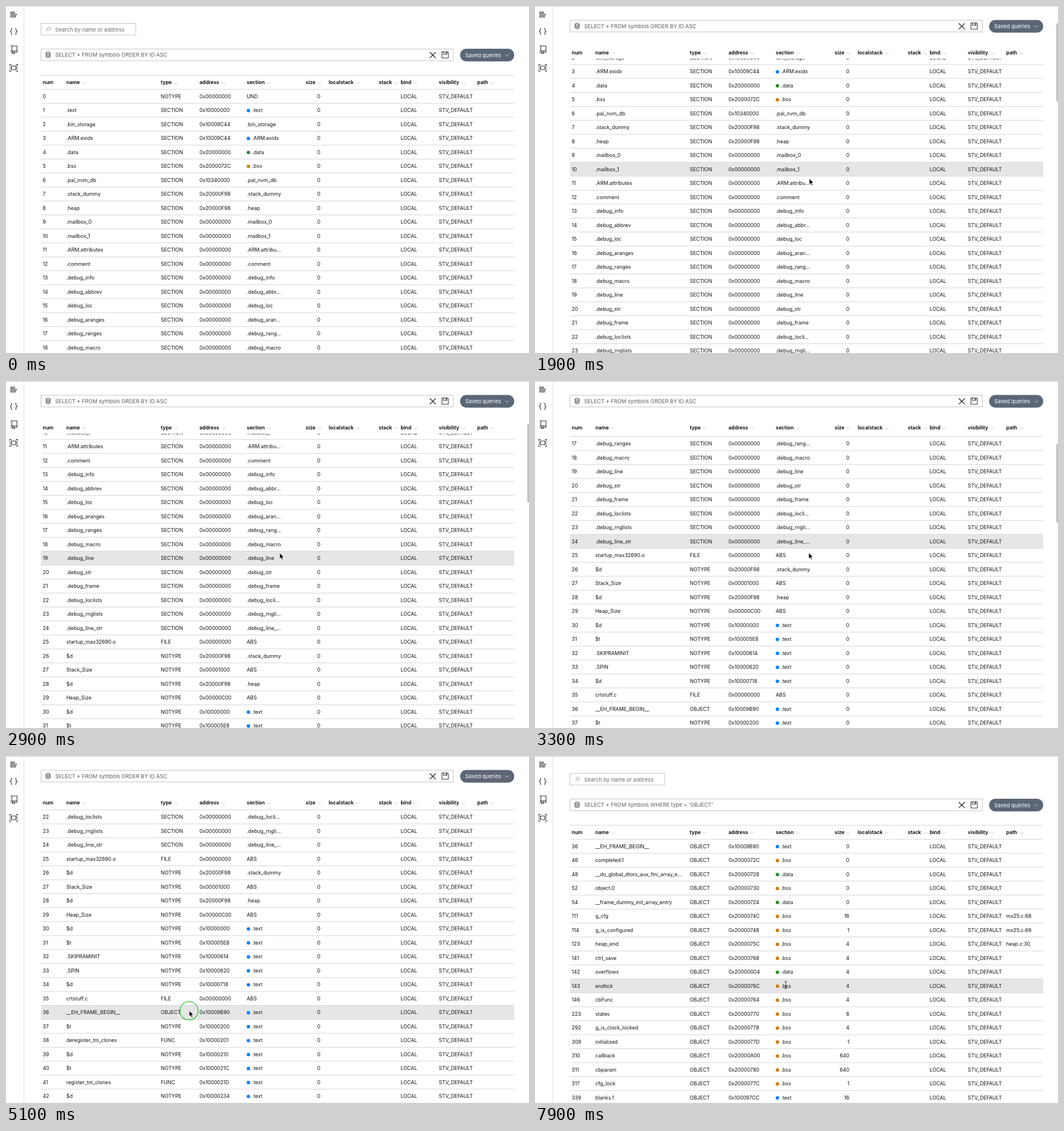
An HTML page for the animation above (8000 ms loop, 919 by 609 pixels).

```html
<!DOCTYPE html>
<html lang="en">
<head>
<meta charset="utf-8">
<title>Symbol table</title>
<style>
  html, body { margin: 0; width: 100%; height: 100%; overflow: hidden; background: #fff; }
  svg { display: block; font: 8.9px Inter, "Open Sans", sans-serif; fill: #111; }
  text { white-space: pre; }
  .head text { font-weight: 600; fill: #000; }
  .bar text { font-size: 9.4px; fill: #5c5c5c; }
  .bar .button { fill: #fff; }
  .line { stroke: #d6d6d6; stroke-width: 1; }
  .icon { fill: none; stroke: #333; stroke-width: 1.1; }
  .box { fill: #fff; stroke: #c4c4c4; }
  .chev { fill: none; stroke: #bdbdbd; stroke-width: .8; }
</style>
</head>
<body>
<svg id="stage" width="919" height="609" viewBox="0 0 919 609">
  <rect width="919" height="609" fill="#fff"/>
  <g id="body">
    <rect id="hover" x="61.5" width="831.5" height="24.5" fill="#e6e6e6"/>
    <path class="line" d="M61.5 146.2H893"/>
    <g id="all"></g>
    <g id="objects"></g>
  </g>
  <g id="head" class="head">
    <rect x="33" width="880" height="144.5" fill="#fff"/>
    <path id="headLine" class="line" d="M61.5 121.5H893"/>
  </g>
  <g id="bar" class="bar">
    <rect class="box" x="61.5" y="30.5" width="166.5" height="20.5"/>
    <g class="icon" style="stroke:#999;stroke-width:.9"><circle cx="75.4" cy="39.8" r="2.9"/><path d="M73.3 41.9L70.2 45"/></g>
    <text x="86.5" y="44.6" style="fill:#6a6a6a">Search by name or address</text>
    <rect class="box" x="61.5" y="75.5" width="724.5" height="20.5"/>
    <g class="icon" style="stroke-width:.9">
      <ellipse cx="74" cy="82.2" rx="3.6" ry="1.5"/>
      <path d="M70.4 82.2V89a3.6 1.5 0 0 0 7.2 0V82.2M70.4 84.5a3.6 1.5 0 0 0 7.2 0M70.4 86.8a3.6 1.5 0 0 0 7.2 0"/>
    </g>
    <text id="query" x="86.5" y="89.1"></text>
    <path class="icon" style="stroke:#222;stroke-width:1.3" d="M744.6 81L755.2 91.4M755.2 81L744.6 91.4"/>
    <path class="icon" d="M766 80.3H776L777.2 81.5V91.3H766ZM768.6 80.5V84.5H774.6V80.5M773 81V83.6"/>
    <rect x="798" y="75" width="95" height="22.3" rx="11.1" fill="#5c6776"/>
    <text class="button" x="807" y="89.5">Saved queries</text>
    <path d="M877 84.8L880.4 88L883.8 84.8" fill="none" stroke="#d5d9de" stroke-width=".9"/>
  </g>
  <path d="M31.5 0V609" stroke="#dedede"/>
  <path d="M0 .5H919" stroke="#cfcfcf"/>
  <g class="icon">
    <path d="M8 10.5H15V12.4H8ZM8 14H18.5V15.9H8ZM8 17.6H17V19.5H8Z" style="stroke-width:.9"/>
    <path d="M11 39.2C8.2 39.2 9.6 41.4 9.3 43C9.1 44.2 8 44.5 7 44.6C8 44.7 9.1 45 9.3 46.2C9.6 47.8 8.2 50 11 50M16 39.2C18.8 39.2 17.4 41.4 17.7 43C17.9 44.2 19 44.5 20 44.6C19 44.7 17.9 45 17.7 46.2C17.4 47.8 18.8 50 16 50"/>
    <path d="M8 70H19.3V81.2H14.8M11.5 81.2H8ZM10.3 70V78.8M8 78.8H19.3M11.6 79V83.5L13.1 82.2L14.6 83.5V79"/>
    <path d="M9.6 105.2H17.4V111.8H9.6ZM6.8 105V102.6H9.6M17.4 102.6H20.2V105M20.2 112V114.5H17.4M9.6 114.5H6.8V112M6.5 107H9.6M6.5 110H9.6M17.4 107H20.5M17.4 110H20.5"/>
  </g>
  <rect id="thumb" x="916" width="6" height="138" rx="3" fill="#c1c1c1"/>
  <circle id="ring" cx="321.5" cy="447.2" r="16" fill="none" stroke="#2cc02c" stroke-width="1.3"/>
  <path id="arrow" d="M0 0V10.2L2.4 8.1L4.1 11.9L5.8 11.1L4.2 7.5H7.5Z" fill="#000" stroke="#fff" stroke-width=".7"/>
  <path id="beam" d="M-2.3 -6.5Q0 -6.5 0 -5V5Q0 6.5 -2.3 6.5M2.3 -6.5Q0 -6.5 0 -5M0 5Q0 6.5 2.3 6.5M-1.3 2.5H1.3" fill="none" stroke="#222" stroke-width=".9"/>
</svg>
<script>
const PERIOD = 8000, STEP = 100, ROW = 24.5, TOP = 146;
const RESULT_AT = 6500, HOVER_LAG = 60;
const $ = id => document.getElementById(id);

function add(parent, tag, attrs, text) {
  const el = document.createElementNS("http://www.w3.org/2000/svg", tag);
  for (const key in attrs) el.setAttribute(key, attrs[key]);
  if (text) el.textContent = text;
  parent.append(el);
  return el;
}

// label, text x, chevron x
[["num", 64.5], ["name", 106, 137], ["type", 272, 298.5], ["address", 340, 382], ["section", 423, 462],
 ["size", 526.5, 550.5], ["localstack", 567, 618], ["stack", 655, 686], ["bind", 693.5, 719],
 ["visibility", 760.5, 804], ["path", 828, 855]].forEach(([label, x, chevron]) => {
  add($("head"), "text", { x, y: 137 }, label);
  if (chevron) add($("head"), "path", { class: "chev", d: `M${chevron - 3.5} 133.5l3.5 3l3.5 -3` });
});

const DOTS = { ".text": "#1a80f2", ".ARM.exidx": "#1a80f2", ".data": "#2d8a2d", ".bss": "#c87f1c" };

function addRow(parent, index, [num, name, type, address, section, size = "0", path]) {
  const y = TOP + index * ROW + 15.6;
  const cell = (x, text, more) => add(parent, "text", { x, y, ...more }, text);
  const dot = DOTS[section];
  cell(64.5, num);
  cell(106, name);
  cell(272, type);
  cell(340, "0x" + address);
  if (dot) add(parent, "circle", { cx: 426, cy: y - 2.6, r: 3.1, fill: dot });
  cell(dot ? 432.5 : 423, section);
  cell(552.3, size, { "text-anchor": "end" });
  cell(693.5, "LOCAL");
  cell(760.5, "STV_DEFAULT");
  if (path) cell(828, path);
  const lineY = TOP + (index + 1) * ROW + .2;
  add(parent, "path", { class: "line", d: `M61.5 ${lineY}H893` });
}

// name, address, shown section if shortened
const sections = `.text 10000000
.bin_storage 10009C44
.ARM.exidx 10009C44
.data 20000000
.bss 2000072C
.pal_nvm_db 10340000
.stack_dummy 20000F98
.heap 20000F98
.mailbox_0
.mailbox_1
.ARM.attributes 00000000 .ARM.attribu...
.comment
.debug_info
.debug_abbrev 00000000 .debug_abbr...
.debug_loc
.debug_aranges 00000000 .debug_aran...
.debug_ranges 00000000 .debug_rang...
.debug_macro
.debug_line
.debug_str
.debug_frame
.debug_loclists 00000000 .debug_locli...
.debug_rnglists 00000000 .debug_rngli...
.debug_line_str 00000000 .debug_line_...`;

// name, type, address, section
const symbols = `startup_max32690.o FILE 00000000 ABS
$d NOTYPE 20000F98 .stack_dummy
Stack_Size NOTYPE 00001000 ABS
$d NOTYPE 20000F98 .heap
Heap_Size NOTYPE 00000C00 ABS
$d NOTYPE 10000000 .text
$t NOTYPE 100005E8 .text
.SKIPRAMINIT NOTYPE 10000614 .text
.SPIN NOTYPE 10000620 .text
$d NOTYPE 10000718 .text
crtstuff.c FILE 00000000 ABS
__EH_FRAME_BEGIN__ OBJECT 10009B90 .text
$t NOTYPE 10000200 .text
deregister_tm_clones FUNC 10000201 .text
$d NOTYPE 10000210 .text
$t NOTYPE 1000021C .text
register_tm_clones FUNC 1000021D .text
$d NOTYPE 10000234 .text`;

// num, name, address, section, size, path
const objects = `36 __EH_FRAME_BEGIN__ 10009B90 .text 0
46 completed.1 2000072C .bss 0
48 __do_global_dtors_aux_fini_array_e... 20000728 .data 0
52 object.0 20000730 .bss 0
54 __frame_dummy_init_array_entry 20000724 .data 0
111 g_cfg 2000074C .bss 16 mx25.c:68
114 g_is_configured 20000748 .bss 1 mx25.c:69
123 heap_end 2000075C .bss 4 heap.c:30
141 ctrl_save 20000768 .bss 4
142 overflows 20000004 .data 4
143 endtick 2000076C .bss 4
146 cbFunc 20000764 .bss 4
223 states 20000770 .bss 8
292 g_is_clock_locked 20000778 .bss 4
309 initialized 2000077D .bss 1
310 callback 20000A00 .bss 640
311 cbparam 20000780 .bss 640
317 cfg_lock 2000077C .bss 1
339 blanks.1 100097CC .text 16`;

const parse = table => table.split("\n").map(line => line.split(" "));
[
  ["", "NOTYPE", "00000000", "UND"],
  ...parse(sections).map(([name, address = "00000000", shown = name]) => [name, "SECTION", address, shown]),
  ...parse(symbols),
].forEach((row, i) => addRow($("all"), i, [String(i), ...row]));
parse(objects).forEach(([num, name, ...rest], i) => addRow($("objects"), i, [num, name, "OBJECT", ...rest]));

const scrollKeys = [[1600, 0], [1700, 22], [1800, 72], [1900, 117], [2100, 212], [2300, 280], [2500, 313],
  [2900, 313], [3000, 337], [3200, 425], [3400, 505], [3600, 559], [3700, 574], [3800, 589], [3900, 590.5]];
const cursorKeys = [[100, 628, 1], [900, 512, 209], [1300, 485, 290], [1500, 482, 303], [1900, 482, 303],
  [2900, 481, 302], [3800, 481, 301], [4100, 440, 340], [4400, 345, 428], [4600, 323, 445], [4900, 322, 447],
  [5300, 322, 447], [5800, 358, 463], [7300, 358, 463], [7900, 440.5, 402]];

function at(keys, t, column = 1) {
  const next = keys.findIndex(key => key[0] > t);
  if (next < 0) return keys[keys.length - 1][column];
  if (next === 0) return keys[0][column];
  const a = keys[next - 1], b = keys[next];
  return a[column] + (b[column] - a[column]) * (t - a[0]) / (b[0] - a[0]);
}

const clamp = v => Math.max(0, Math.min(1, v));
const move = (id, x, y) => $(id).setAttribute("transform", `translate(${x} ${y})`);
const show = (id, on) => { $(id).style.display = on ? "" : "none"; };

function draw(t) {
  const done = t >= RESULT_AT;
  const scrollAt = time => done ? 0 : at(scrollKeys, time);
  const scroll = scrollAt(t);
  const x = at(cursorKeys, t), y = at(cursorKeys, t, 2);

  show("all", !done);
  show("objects", done);
  $("query").textContent = "SELECT * FROM symbols " + (done ? "WHERE type = 'OBJECT'" : "ORDER BY ID ASC");
  move("body", 0, -scroll);
  move("head", 0, -Math.min(scroll, 52));
  move("bar", 0, -Math.min(scroll, 50.5));
  show("headLine", scroll < 50);

  const row = Math.floor((y + scrollAt(t - HOVER_LAG) - TOP) / ROW);
  show("hover", t >= 100 && row >= 0);
  $("hover").setAttribute("y", TOP + row * ROW);

  $("thumb").setAttribute("y", 3 + scroll * .231);
  $("thumb").style.opacity = t < 1700 ? 0 : clamp((4600 - t) / 300);
  $("ring").style.opacity = t < 5100 ? 0 : clamp((5500 - t) / 300);

  const overText = t >= 7800;
  show("arrow", t >= 100 && !overText);
  show("beam", overText);
  move(overText ? "beam" : "arrow", x, y);
}

const start = performance.now();
function tick() {
  const t = (performance.now() - start) % PERIOD;
  draw(Math.floor(t / STEP) * STEP);
  requestAnimationFrame(tick);
}
tick();
</script>
</body>
</html>
```
